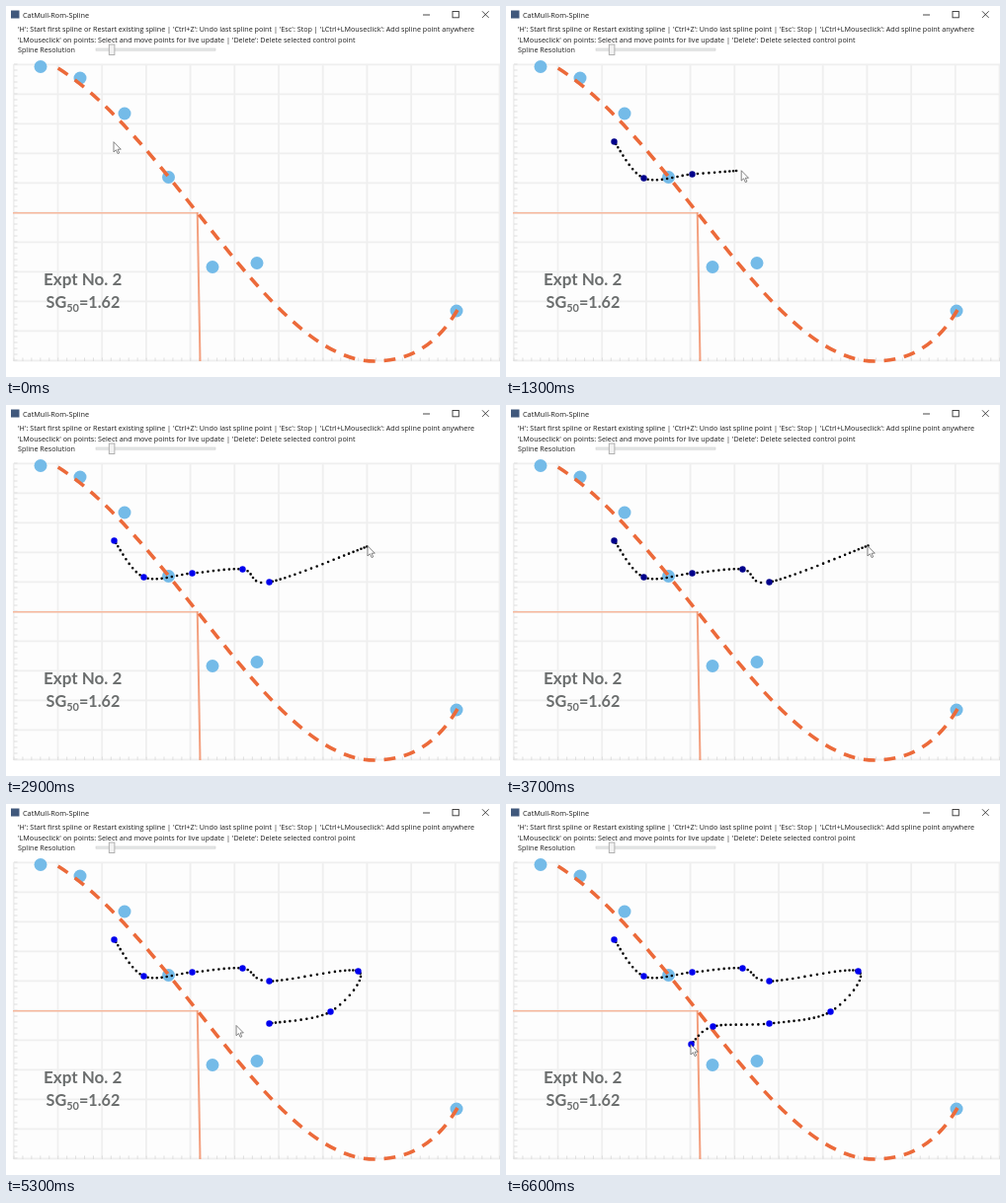
Animation, 500 px wide and 376 px high, one loop 6.7 s. Source, as an HTML page:

```html
<!DOCTYPE html>
<html lang="en">
<head>
<meta charset="utf-8">
<title>CatMull-Rom-Spline</title>
<style>
  html, body { margin: 0; width: 100%; height: 100%; overflow: hidden; background: #fff; }
  svg { display: block; width: 500px; height: 376px; }
  .ui { font: 7.2px "Open Sans", sans-serif; fill: #1c1c1c; }
  .note { font: bold 17px Lato, sans-serif; fill: #6b6e6e; filter: blur(.6px); }
  .grid { stroke: #efefef; stroke-width: 1.8; fill: none; }
  .soft { filter: blur(.6px); }
</style>
</head>
<body>
<svg viewBox="0 0 500 376">
  <rect width="500" height="376" fill="#fff"/>
  <rect x="7" y="58" width="493" height="303" fill="#fdfdfd"/>

  <rect x="5" y="4.5" width="8.5" height="8" fill="#40587c"/>
  <text class="ui" x="17" y="11.6" style="font-size:7.3px">CatMull-Rom-Spline</text>
  <g fill="none" stroke="#333" stroke-width=".9">
    <path d="M422 9H429M482 5.3l6.6 6.6M488.6 5.3l-6.6 6.6"/>
    <rect x="452" y="5.5" width="6.3" height="6.3"/>
  </g>

  <text class="ui" x="12" y="26.3">'H': Start first spline or Restart existing spline | 'Ctrl+Z': Undo last spline point | 'Esc': Stop | 'LCtrl+LMouseclick': Add spline point anywhere</text>
  <text class="ui" x="12" y="36.6">'LMouseclick' on points: Select and move points for live update | 'Delete': Delete selected control point</text>
  <text class="ui" x="12" y="46.8" font-weight="bold">Spline Resolution</text>
  <rect x="91" y="43" width="121" height="2.2" fill="#e4e6e6" stroke="#cfcfcf" stroke-width=".6"/>
  <rect x="104.3" y="39" width="5.6" height="10.5" fill="#f2f2f2" stroke="#a9a9a9" stroke-width=".9"/>

  <g class="soft">
    <path class="grid" id="grid"/>
    <path class="grid" id="ticks" style="stroke:#dcdcdc;stroke-width:.9"/>
    <path d="M7 209.7H194" stroke="#f6b79c" stroke-width="1.5"/>
    <path d="M193.7 209L196.5 360" stroke="#f3a07f" stroke-width="2"/>
    <g id="marks" fill="#74bbe8"></g>
    <path d="M46 59C166 128.600 266.300 360 373 360C410 360 437 342 457 308" pathLength="566"
      fill="none" stroke="#ec6a3a" stroke-width="3.6" stroke-dasharray="12 9" stroke-dashoffset="-8"/>
  </g>
  <text class="note" x="38" y="283">Expt No. 2</text>
  <text class="note" x="40.5" y="306" style="font-size:16.2px">SG<tspan font-size="11" dy="3.5">50</tspan><tspan dy="-3.5">=1.62</tspan></text>

  <g transform="translate(.5 .5)" fill="none" stroke-linecap="round">
    <path id="dots" stroke="#000" stroke-width="2.6"/>
    <path id="knots" stroke-width="6.4"/>
  </g>
  <path id="cursor" d="M0 .7v10.300l2.400-2.200 1.700 3.800 1.600-.7-1.600-3.700h3.200z" fill="#fff" stroke="#666" stroke-width=".8"/>
</svg>
<script>
const $ = id => document.getElementById(id);
const LOOP = 6700, STEP = 100, GLIDE = 400, SPACING = 5;

// where the pointer arrives and when; "pass" stops leave no control point
const stops = [
  { t: 300, at: [109, 137] },
  { t: 700, at: [139, 174] },
  { t: 1000, at: [188, 170] },
  { t: 1400, at: [239, 166] },
  { t: 1600, at: [266, 179] },
  { t: 1900, at: [266, 179], pass: true },
  { t: 2200, at: [287, 208], pass: true },
  { t: 2900, at: [366, 142], pass: true },
  { t: 4100, at: [356, 169] },
  { t: 4300, at: [328, 210] },
  { t: 4400, at: [306, 214], pass: true },
  { t: 4800, at: [266, 222] },
  { t: 5600, at: [209, 225] },
  { t: 6300, at: [187, 243] }
];
const easeOut = u => 1 - (1 - u) ** 3;

function pointerAt(t) {
  const i = stops.findIndex(s => s.t >= t);
  if (i < 0) return stops.at(-1).at;
  if (i === 0) return stops[0].at;
  const from = stops[i - 1], to = stops[i];
  const leave = Math.max(from.t, to.t - GLIDE);
  const k = easeOut(Math.max(0, (t - leave) / (to.t - leave)));
  return from.at.map((v, j) => v + (to.at[j] - v) * k);
}

function catmull(a, b, c, d, u) {
  return [0, 1].map(i => b[i] + .5 * u * (c[i] - a[i]
    + u * (2 * a[i] - 5 * b[i] + 4 * c[i] - d[i]
    + u * (3 * (b[i] - c[i]) + d[i] - a[i]))));
}

function spline(pts) {
  const out = pts.slice(0, 1), at = i => pts[Math.min(pts.length - 1, Math.max(0, i))];
  for (let i = 0; i < pts.length - 1; i++) {
    const b = pts[i], c = pts[i + 1];
    const n = Math.round(Math.hypot(c[0] - b[0], c[1] - b[1]) / SPACING);
    for (let j = 1; j <= n; j++) out.push(catmull(at(i - 1), b, c, at(i + 2), j / n));
  }
  return out;
}

const dotPath = pts => pts.map(([x, y]) => `M${x.toFixed(2)} ${y.toFixed(2)}h.01`).join("");

function drawChart() {
  let grid = "", ticks = "";
  for (let i = 0; i <= 11; i++) grid += `M${7.8 + i * 44.7} 59V360`;
  for (let i = 0; i <= 10; i++) grid += `M8 ${59.3 + i * 30}H500`;
  for (let y = 59; y < 360; y += 6) ticks += `M8 ${y}h3.5`;
  for (let x = 8; x < 500; x += 8.94) ticks += `M${x} 360v-3.5`;
  $("grid").setAttribute("d", grid);
  $("ticks").setAttribute("d", ticks);

  const marks = [[35, 61.5], [75, 73], [120, 109], [164.5, 173.5], [209, 264.5], [254, 260.5], [456, 309]];
  $("marks").innerHTML = marks.map(([x, y]) => `<circle cx="${x}" cy="${y}" r="6.5"/>`).join("");
}

function draw(now) {
  const t = Math.floor(now % LOOP / STEP) * STEP;
  // the free end trails the pointer by one step, then becomes a control point
  const placed = stops.filter(s => !s.pass && s.t < t).map(s => s.at);
  const pts = placed.length ? [...placed, pointerAt(t - STEP)] : [];
  const dark = t >= 1000 && t < 1700 || t >= 3500 && t < 4200;

  $("dots").setAttribute("d", dotPath(spline(pts)));
  $("knots").setAttribute("d", dotPath(placed));
  $("knots").setAttribute("stroke", dark ? "#00008b" : "#0000ee");
  $("cursor").setAttribute("transform", `translate(${pointerAt(t)})`);
}

drawChart();
const start = performance.now();
function tick() {
  draw(performance.now() - start);
  requestAnimationFrame(tick);
}
tick();
</script>
</body>
</html>
```
